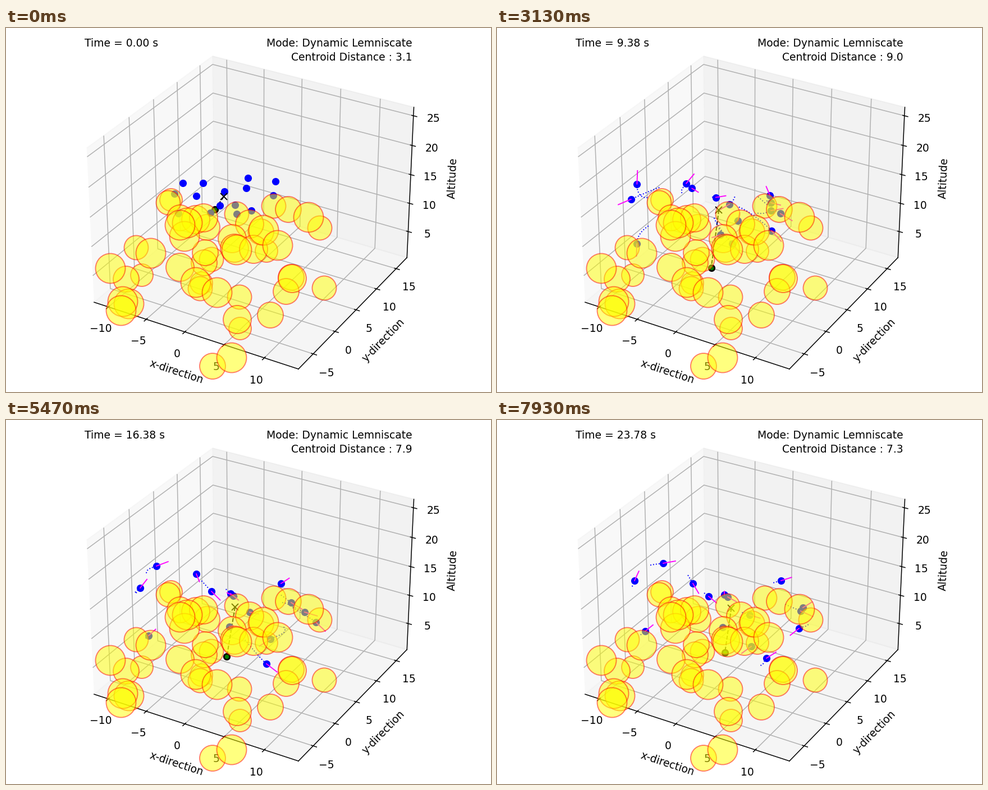
A matplotlib script that plays this animation: 864x648 px, repeating every 8000 ms.

```python
import numpy as np
import matplotlib.pyplot as plt
from matplotlib.animation import FuncAnimation
from matplotlib.collections import PatchCollection
from matplotlib.patches import Circle

W, H, DPI = 864, 648, 135
FRAMES, INTERVAL = 125, 64
LAST = 119            # last simulation step; a step is 1/15 s on screen
TRAIL = 30            # trail length in steps

fig = plt.figure(figsize=(W / DPI, H / DPI), dpi=DPI)

# --- 3D box -----------------------------------------------------------
box = fig.add_axes([0, 0, 1, 1], projection="3d")
HALF = 13.05
for axis, middle in zip("xyz", (1.12, 4.77, 13.37)):
    box.set(**{axis + "lim": (middle - HALF, middle + HALF)})
box.set(xlabel="x-direction", ylabel="y-direction", zlabel="Altitude")

clock = box.text2D(0.05, 0.9485, "", transform=box.transAxes)
box.text2D(0.95, 0.9485, "Mode: Dynamic Lemniscate", ha="right",
           transform=box.transAxes)
gauge = box.text2D(0.95, 0.91, "", ha="right", transform=box.transAxes)

# --- flat layer in pixels, points are x + yj ---------------------------
flat = fig.add_axes([0, 0, 1, 1])
flat.set(xlim=(0, W), ylim=(H, 0))
flat.axis("off")

# obstacle centres by radius
obstacles = {
    20: [294+306j, 464+397j, 348+454j, 242+440j, 417+535j],
    21.5: [289+311j, 411+331j, 477+317j, 559+356j, 366+412j, 346+464j,
           416+479j, 567+463j, 232+391j],
    23: [310+338j, 503+323j, 358+355j, 454+363j, 353+418j, 355+400j,
         368+602j, 471+511j, 508+444j, 499+469j, 214+447j],
    25: [338+341j, 352+338j, 434+349j, 403+375j, 407+392j, 441+394j,
         310+426j, 412+519j, 510+446j],
    26.5: [318+371j, 323+347j, 310+351j, 539+337j, 459+360j, 411+395j,
           484+387j, 338+453j, 376+471j, 402+587j, 258+401j, 186+428j,
           219+491j, 208+487j, 205+503j],
}
flat.add_collection(PatchCollection(
    [Circle((c.real, c.imag), r) for r, row in obstacles.items() for c in row],
    facecolor=(1, 1, 0, 0.5), edgecolor=(1, 0, 0, 0.5), linewidth=1,
    zorder=9))

# --- drones: smooth paths from rest through a few waypoints -------------
KEYS = np.array([0, 19, 57, 82, LAST])
left = [
    [315+276j, 286+285j, 230+308j, 239+299j, 245+286j],
    [300+295j, 265+302j, 251+269j, 268+260j, 296+255j],
    [339+299j, 329+293j, 340+273j, 339+274j, 349+291j],
    [351+276j, 348+284j, 350+288j, 366+305j, 377+314j],
    [307+330j, 266+355j, 249+389j, 254+384j, 264+376j],
    [389+291j, 384+301j, 393+302j, 400+309j, 411+315j],
    [428+285j, 423+302j, 411+315j, 405+313j, 405+311j],
]
right = [
    [408+315j, 434+320j, 497+374j, 471+390j, 453+403j],
    [381+316j, 388+341j, 432+399j, 464+434j, 480+424j],
    [364+329j, 394+356j, 397+369j, 398+368j, 402+369j],
    [411+331j, 424+344j, 430+342j, 434+342j, 450+347j],
    [480+273j, 488+297j, 486+296j, 490+291j, 506+286j],
    [431+267j, 469+304j, 517+338j, 552+360j, 538+371j],
    [437+325j, 467+330j, 497+326j, 532+342j, 545+334j],
    [476+298j, 481+308j, 492+313j, 508+325j, 541+340j],
]
paths = np.array(left + right)
slopes = np.gradient(paths, KEYS, axis=1)
slopes[:, 0] = 0


def position(t):
    """Cubic Hermite curve of every drone at step t (number or array)."""
    i = np.clip(np.searchsorted(KEYS, t, "right") - 1, 0, len(KEYS) - 2)
    span = KEYS[i + 1] - KEYS[i]
    s = (t - KEYS[i]) / span
    ease = s * s * (3 - 2 * s)
    bend = slopes[:, i] * (1 - s) - slopes[:, i + 1] * s
    return (paths[:, i] * (1 - ease) + paths[:, i + 1] * ease
            + span * s * (1 - s) * bend)


def arrow(t):
    """Heading of every drone; its length levels off at 28 pixels."""
    v = (position(t + 0.1) - position(t - 0.1)) / 0.2
    return 28 * v / (abs(v) + 0.2)


def goal(k):
    if k == 0:
        return 372 + 323j
    return 366 + 435j + (40 - 21j) * (k - 1) / (LAST - 1)


def distance(k):
    if k == 0:
        return 3.1
    return 6.6 + 5.44 * np.exp(-(k - 1) / 56)


def line(style, z, **kw):
    return flat.plot([], [], style, zorder=z, **kw)[0]


def put(artist, points):
    points = np.asarray(points, complex)
    artist.set_data(points.real, points.imag)


def pieces(rows):
    """Join the rows into one line with a gap after each."""
    gap = np.full((len(rows), 1), complex(np.nan, np.nan))
    return np.hstack([rows, gap]).ravel()


link = line("k--", 2, lw=1)
mark = line("o", 3, mfc="g", mec="k", ms=5.5, mew=1.5)
trails = line("b:", 4, lw=1)
dots = line("bo", 5, ms=6)
arrows = line("-", 6, color="magenta", lw=1)
cross = line("kx", 7, ms=6)


def update(n):
    k = min(-(-n * INTERVAL * FRAMES // 8000 * 24 // 25), LAST)
    now = position(k)
    center, target = now.mean(), goal(k)
    put(dots, now)
    put(cross, [center])
    put(mark, [target])
    put(link, [center, target])
    put(arrows, pieces(np.column_stack([now, now + arrow(k)])) if k else [])
    past = np.linspace(k - TRAIL, k, 2 * TRAIL + 1)
    put(trails, pieces(position(past)) if k > TRAIL else [])
    clock.set_text(f"Time = {max(0, 0.2 * k - 0.02):.2f} s")
    gauge.set_text(f"Centroid Distance : {distance(k):.1f}")
    return link, mark, trails, dots, arrows, cross, clock, gauge


anim = FuncAnimation(fig, update, frames=FRAMES, interval=INTERVAL,
                     init_func=lambda: update(0), repeat=True, repeat_delay=0)
plt.show()
```
